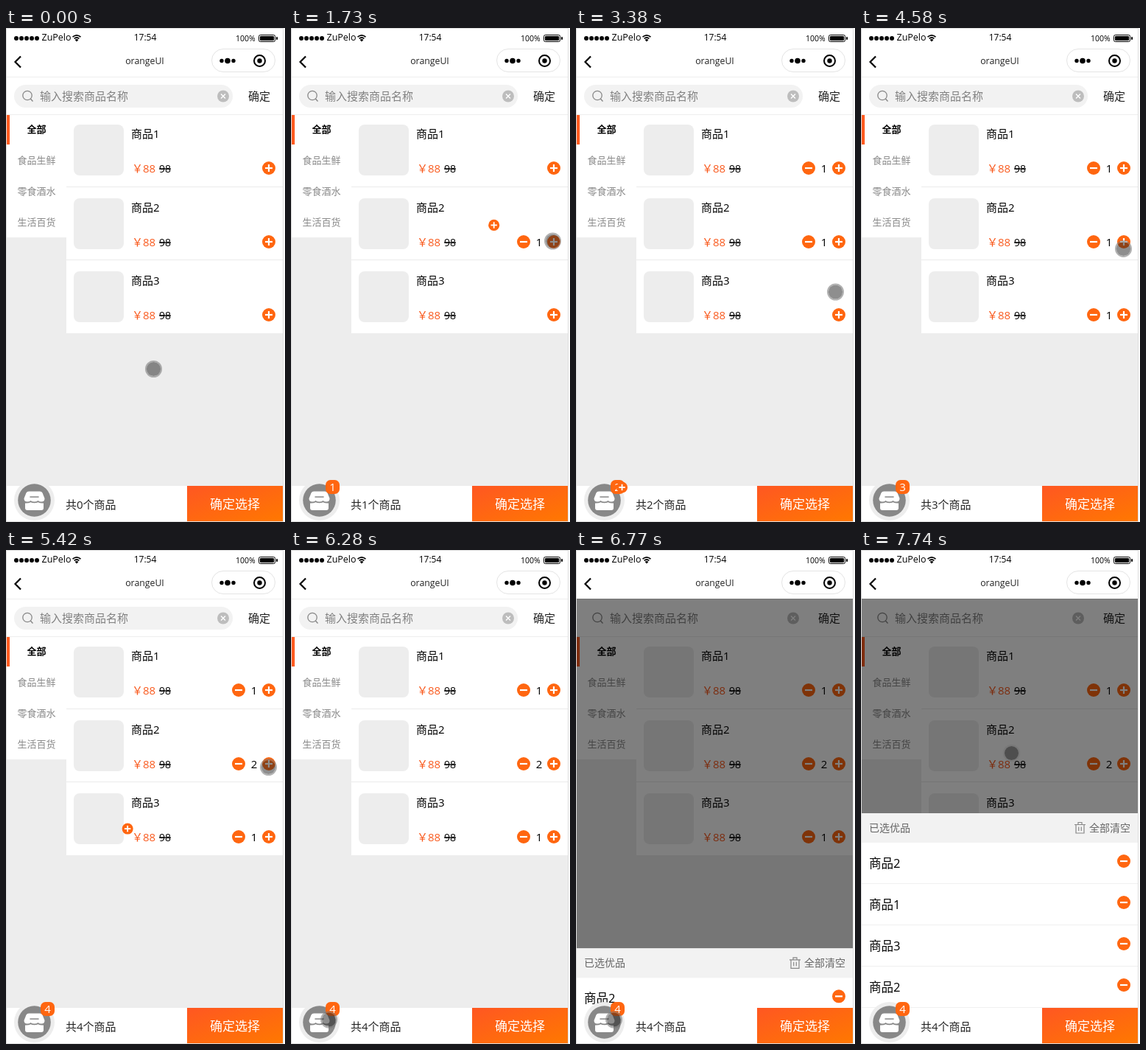
Animation, 379 px wide and 670 px high, one loop 8 s. Source, as an HTML page:

```html
<!DOCTYPE html>
<html lang="zh-CN">
<head>
<meta charset="utf-8">
<style>
html, body { margin: 0; width: 100%; height: 100%; overflow: hidden; background: #fff; }
svg { display: block; font-family: "Open Sans", "Noto Sans CJK SC", "Noto Sans CJK", sans-serif; font-size: 15px; }
.mid { text-anchor: middle; }
</style>
</head>
<body>
<svg id="stage" width="379" height="670" viewBox="0 0 379 670"></svg>
<script>
const LOOP = 8000;
const ORANGE = '#ff6610';
const CLICKS = [[1730, 1], [3110, 0], [4190, 2], [5150, 1]]; // time, product index
const DIM_AT = 6530, SHEET_AT = 6590, SHEET_MS = 360;
const SHEET_TOP = 357, FOOT = 621;
const FLIGHT_MS = 380, FLIGHT_LEAD = 103;

// The picture refreshes in bursts: first time, last time, number of refreshes
const BURSTS = [[0, 0, 1], [300, 1050, 7], [1730, 2710, 8], [2830, 2830, 1], [3110, 3920, 7],
  [4190, 4850, 6], [5150, 6130, 8], [6280, 6280, 1], [6530, 6530, 1], [6650, 7310, 6], [7470, 7740, 3]];

// Pointer path: time, x, y
const PATH = [[175, 200.5, 462.5], [1050, 355.5, 289], [1870, 355.5, 289], [2710, 360, 197.5],
  [2830, 359, 195], [3110, 359, 195], [3380, 352.5, 358], [3800, 356.5, 390], [4190, 356.5, 390],
  [4580, 356.5, 299.5], [4850, 356.5, 294.5], [5290, 356.5, 294.5], [6130, 52.5, 643],
  [6280, 51.5, 637], [6650, 51.5, 637], [7310, 132.5, 430], [7740, 204.5, 275.5]];

const rowY = i => 190 + Math.round(i * 99.5);
const text = (x, y, s, attrs = '') => `<text x="${x}" y="${y}" ${attrs}>${s}</text>`;
const rect = (x, y, w, h, fill, attrs = '') =>
  `<rect x="${x}" y="${y}" width="${w}" height="${h}" fill="${fill}" ${attrs}/>`;
const circle = (x, y, r, fill, attrs = '') => `<circle cx="${x}" cy="${y}" r="${r}" fill="${fill}" ${attrs}/>`;
const line = (d, color, width = 1, attrs = '') =>
  `<path d="${d}" fill="none" stroke="${color}" stroke-width="${width}" ${attrs}/>`;
const minus = (x, y) => circle(x, y, 9, ORANGE) + line(`M${x - 5} ${y}h10`, '#fff', 2.2);
const plus = (x, y) => minus(x, y) + line(`M${x} ${y - 5}v10`, '#fff', 2.2);

function header() {
  return rect(1, 1, 375, 65, '#fff')
    + [14, 21, 28, 35, 42].map(x => circle(x, 14, 3, '#000')).join('')
    + text(48.5, 17, 'ZuPelo', 'font-size="12.5"')
    + line('M90.5 12.2q5.5-4.6 11 0M92.6 14.4q3.4-2.8 6.8 0', '#000', 1.7)
    + '<path d="M96 18.5l-2.4-2.6q2.4-1.8 4.8 0z"/>'
    + text(189, 17, '17:54', 'class="mid" font-size="12"')
    + text(312, 18, '100%', 'font-size="10.5"')
    + rect(343.5, 9.5, 22, 9, 'none', 'rx="2" stroke="#000"')
    + rect(345, 11, 19, 6, '#000', 'rx="1"') + rect(367, 12, 2, 4, '#000', 'rx="1"')
    + line('M20 38.5l-7.5 7.5 7.5 7.5', '#000', 2.2)
    + text(188.5, 49, 'orangeUI', 'class="mid" font-size="12.3" fill="#222"')
    + rect(279.5, 28.5, 86, 31, '#fff', 'rx="15.5" stroke="#e4e4e4"')
    + circle(293, 44.5, 2.7, '#000') + circle(301, 44.5, 3.8, '#000') + circle(309, 44.5, 2.7, '#000')
    + circle(344.5, 44.5, 7.5, 'none', 'stroke="#000" stroke-width="2"') + circle(344.5, 44.5, 3.2, '#000')
    + line('M1 66.5h375', '#eee');
}

function search() {
  return rect(1, 67, 375, 51, '#fff') + line('M1 117.5h375', '#eee')
    + rect(11, 77, 297, 31, '#f2f2f2', 'id="field" rx="15.5"')
    + circle(29, 91.5, 6.2, 'none', 'stroke="#888" stroke-width="1.3"')
    + line('M33.3 96l3.2 3.4', '#888', 1.4)
    + text(46, 98, '输入搜索商品名称', 'fill="#808080"')
    + circle(295, 92.5, 8, '#bdbdbd') + line('M292 89.5l6 6m0-6l-6 6', '#fff', 1.4)
    + text(329, 98, '确定', 'fill="#222"');
}

function tabs() {
  const names = ['全部', '食品生鲜', '零食酒水', '生活百货'];
  return rect(1, 118, 81, 166, '#fff') + rect(1, 118, 4, 40, '#ff5a1f')
    + names.map((s, i) => text(41.5, 142 + i * 42, s, 'class="mid" font-size="13" '
      + (i ? 'fill="#888"' : 'font-weight="700"'))).join('');
}

function product(i) {
  const y = rowY(i);
  return rect(92, y - 59, 68, 69, '#ededed', 'rx="8"')
    + text(170, y - 41, `商品${i + 1}`)
    + text(171, y + 6, '￥88', 'fill="#f95a1e"')
    + text(208, y + 6, '98', 'font-size="14" text-decoration="line-through"')
    + `<g id="less${i}">${minus(316, y)}${text(337, y + 5.5, '', `id="qty${i}" class="mid"`)}</g>`
    + plus(357, y);
}

function sheet() {
  const rows = CLICKS.map(([, p], i) => {
    const y = 65 + i * 56;
    return text(11, y + 9, `商品${p + 1}`, 'font-size="16.5"') + minus(357, y)
      + line(`M1 ${y + 30.5}h375`, '#f0f0f0');
  });
  return `<g id="sheet">${rect(1, 0, 375, 264, '#fff')}${rect(1, 0, 375, 40, '#f2f2f2')}`
    + text(11, 25, '已选优品', 'font-size="14" fill="#666"')
    + line('M290 15.5h15M295 15v-2.5h5v2.5M292 16v11h11v-11M295.7 18.5v5.5M299.3 18.5v5.5', '#888', 1.2)
    + text(310, 25, '全部清空', 'font-size="14" fill="#666"') + rows.join('') + '</g>';
}

function footer() {
  return rect(1, FOOT, 375, 48, '#fff') + rect(246, FOOT, 130, 48, 'url(#warm)')
    + text(311, 652, '确定选择', 'class="mid" font-size="17" fill="#fff"')
    + text(81, 652, '', 'id="total" fill="#222"')
    + circle(38.5, 640.5, 27.5, '#ededed') + circle(38.5, 640.5, 22.3, '#888')
    + '<path d="M31 628.500h15q2.500 0 3.500 2l3 7.500q0 4.500-4.500 4.500-2.700 0-4.500-1.500-2 1.500-5 1.500t-5-1.500q-1.800 1.500-4.500 1.500-4.500 0-4.500-4.500l3-7.500q1-2 3.500-2z" fill="#fff"/>'
    + '<path d="M26 644.500q4.500.300 7.500-1.300 5 2 10 0 3 1.600 7.500 1.300v6.500q0 3-3 3h-19q-3 0-3-3z" fill="#fff"/>'
    + line('M33 636h11', '#888', 1.6, 'stroke-linecap="round"')
    + `<g id="badge">${rect(47, 613, 19, 19, ORANGE, 'rx="6.5"')}`
    + text(56.5, 628, '', 'id="badgeNum" class="mid" fill="#fff"') + '</g>';
}

const stage = document.getElementById('stage');
stage.innerHTML = `<defs>
  <linearGradient id="warm" x1="0" y1="0" x2="1" y2="1"><stop stop-color="#ff5722"/><stop offset="1" stop-color="#ff7800"/></linearGradient>
  <clipPath id="body"><rect x="1" y="66" width="375" height="555"/></clipPath></defs>`
  + rect(0.5, 0.5, 376, 669, '#ededed', 'stroke="#ddd"')
  + header() + search() + tabs()
  + rect(82, 118, 294, 296, '#fff') + line('M82 215.5h294M82 314.5h294', '#ebebeb')
  + [0, 1, 2].map(product).join('')
  + `<g clip-path="url(#body)">${rect(1, 66, 375, 555, '#000', 'id="dim" fill-opacity=".5"')}${sheet()}</g>`
  + footer()
  + `<g id="ball">${plus(0, 0)}</g>`
  + `<g id="pointer">${circle(0, 0, 9.6, 'rgba(30,30,30,.5)')}${circle(0, 0, 10.5, 'none', 'stroke="rgba(115,115,115,.55)" stroke-width="2"')}</g>`;

const $ = id => document.getElementById(id);
const show = (id, on) => $(id).setAttribute('display', on ? 'inline' : 'none');
const move = (id, x, y, k = 1) => $(id).setAttribute('transform', `translate(${x} ${y}) scale(${k})`);
const clamp = v => Math.max(0, Math.min(1, v));

function refreshTime(t) {
  const [a, b, n] = BURSTS.filter(s => s[0] <= t).pop();
  if (n === 1) return a;
  const step = (b - a) / (n - 1);
  return a + step * Math.min(n - 1, Math.floor((t - a + 8) / step));
}

function pointerAt(t) {
  const i = PATH.findIndex(p => p[0] >= t);
  if (i <= 0) return PATH[i < 0 ? PATH.length - 1 : 0].slice(1);
  const [t0, x0, y0] = PATH[i - 1], [t1, x1, y1] = PATH[i];
  const u = (t - t0) / (t1 - t0), e = u * u * (3 - 2 * u);
  return [x0 + (x1 - x0) * e, y0 + (y1 - y0) * e];
}

function draw(now) {
  const t = refreshTime(now % LOOP);
  const done = CLICKS.filter(c => c[0] <= t);
  const count = done.length;
  for (let i = 0; i < 3; i++) {
    const qty = done.filter(c => c[1] === i).length;
    show('less' + i, qty);
    $('qty' + i).textContent = qty;
  }
  $('total').textContent = `共${count}个商品`;
  $('badgeNum').textContent = count;
  show('badge', count);

  // Thrown item follows a quadratic curve into the basket
  const last = done[count - 1];
  const s = last ? (t - last[0] + FLIGHT_LEAD) / FLIGHT_MS : 1;
  show('ball', s < 1);
  if (s < 1) {
    const y0 = rowY(last[1]), r = 1 - s;
    move('ball', 357 - 300 * s, r * r * y0 + 2 * r * s * (y0 - 123) + s * s * 644, 0.84);
  }

  const dimmed = t >= DIM_AT;
  show('dim', dimmed);
  show('field', !dimmed);
  const rise = 1 - (1 - clamp((t - SHEET_AT) / SHEET_MS)) ** 2;
  move('sheet', 0, FOOT - (FOOT - SHEET_TOP) * rise);
  move('pointer', ...pointerAt(t));
}

const start = performance.now();
function tick() {
  draw(performance.now() - start);
  requestAnimationFrame(tick);
}
tick();
</script>
</body>
</html>
```
